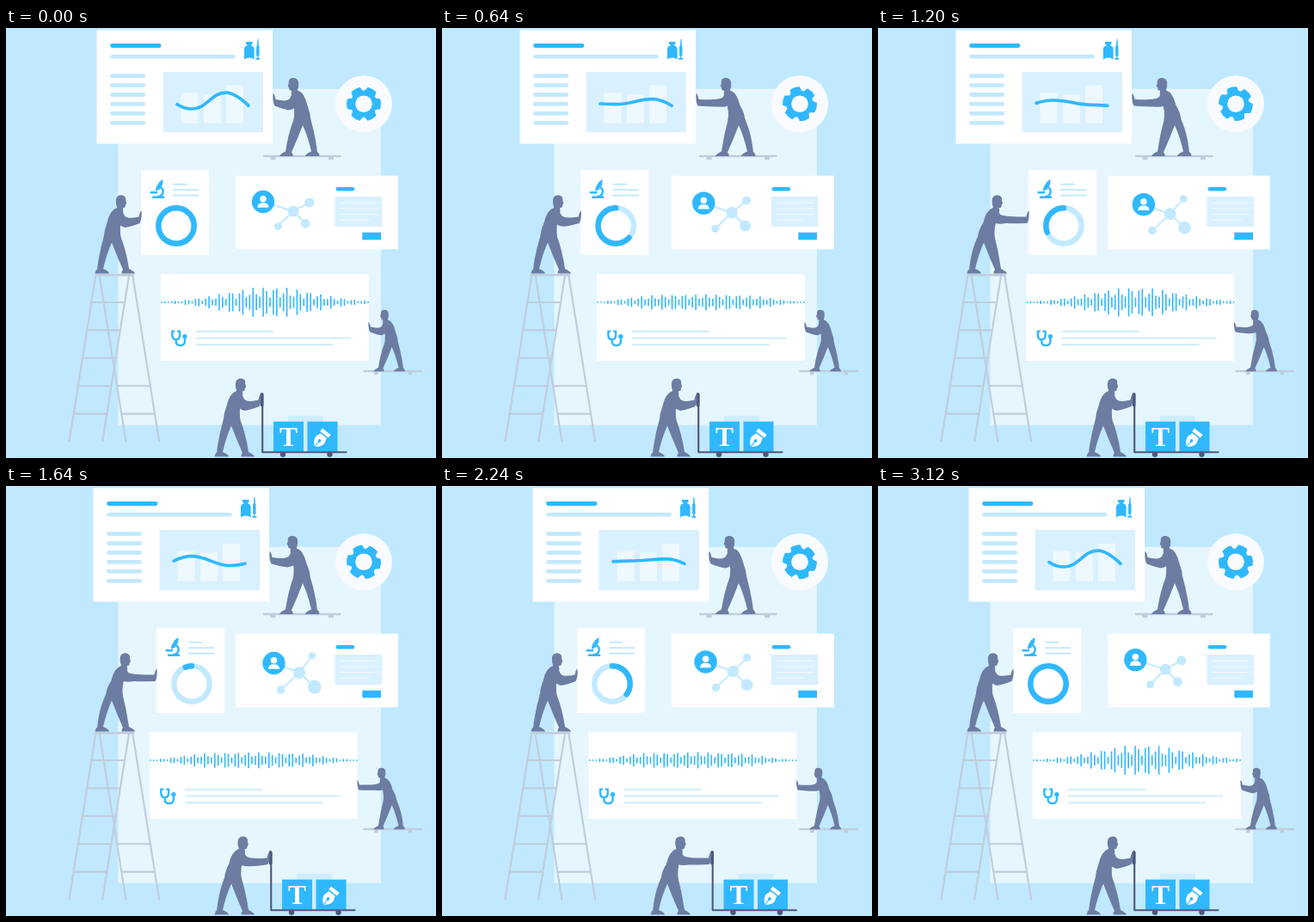
Animation of 500 by 500 pixels, one loop 3160 ms. Source, as an HTML page with a canvas:

```html
<!DOCTYPE html>
<html lang="en">
<head>
<meta charset="utf-8">
<title>Building a health dashboard</title>
<style>
html, body { margin: 0; width: 100%; height: 100%; overflow: hidden; background: #c0e9ff; }
canvas { display: block; width: 500px; height: 500px; }
</style>
</head>
<body>
<canvas id="stage" width="500" height="500"></canvas>
<script>
const ctx = document.getElementById('stage').getContext('2d');
const LOOP = 3160, STEP = 40, TAU = Math.PI * 2;
const SKY = '#c0e9ff', PANEL = '#e6f6ff', BLUE = '#30b8ff', PALE = '#c2e9ff',
  SOFT = '#d9f0ff', MIST = '#eef8ff', MAN = '#6c7ca2', STEEL = '#bfcddb',
  CART = '#4a587f', WHITE = '#fff';

const mix = (a, b, k) => a + (b - a) * k;
const ramp = (t, start, end) => Math.min(1, Math.max(0, (t - start) / (end - start)));
// rises during the first span, falls during the second
const trip = (t, a, b, c, d) => ramp(t, a, b) - ramp(t, c, d);

function rect(x1, y1, x2, y2, color) {
  ctx.fillStyle = color;
  ctx.fillRect(x1, y1, x2 - x1, y2 - y1);
}

function dot(x, y, r, color) {
  ctx.beginPath();
  ctx.arc(x, y, r, 0, TAU);
  ctx.fillStyle = color;
  ctx.fill();
}

function shape(path, color) {
  ctx.fillStyle = color;
  ctx.fill(new Path2D(path));
}

function wire(path, width, color, cap = 'round') {
  ctx.lineWidth = width;
  ctx.strokeStyle = color;
  ctx.lineCap = cap;
  ctx.lineJoin = 'round';
  ctx.stroke(path instanceof Path2D ? path : new Path2D(path));
}

function line(x1, y1, x2, y2, width, color, cap) {
  wire(`M${x1} ${y1}L${x2} ${y2}`, width, color, cap);
}

function arc(x, y, r, from, to, ccw, width, color) {
  const path = new Path2D();
  path.arc(x, y, r, from, to, ccw);
  wire(path, width, color);
}

function at(x, y, draw) {
  ctx.save();
  ctx.translate(x, y);
  draw();
  ctx.restore();
}

// x, y: ground point; reach: how far the hand is pushed out, in pixels
function man(x, y, size, flip, reach) {
  const q = reach / size / 15, lean = -4 * q, hip = lean / 2, hand = -15 * q;
  at(x, y, () => {
    ctx.scale(size * flip, size);
    // legs
    shape(`M${20 + hip}-44Q24-30 26-18Q27.5-10 27.8-5.2Q30.5-3.5 30.5 0H14Q14-2.5 21-5.5
      Q17-23 11-36Q5-20-2-4.5Q0-2.5-.5 0H-16Q-15.5-2.5-9-5.5Q-6-26 ${1 + hip}-44z`, MAN);
    // torso
    shape(`M${5 + lean}-76.5Q${13 + lean}-74 ${16.5 + lean}-59Q${20 + hip}-50 ${20.3 + hip}-42
      H${.6 + hip}Q${2 + hip}-54 ${lean}-64Q${-3 + lean}-71 ${-2 + lean}-75z`, MAN);
    // arm
    shape(`M${5 + lean}-75Q${-1 + lean}-75 ${-3 + lean}-69Q${-5 - 5 * q} ${-62 - 3 * q} ${-20.5 + hand}-66
      Q${-21.5 + hand}-72 ${-23.5 + hand}-73Q${-24.3 + hand}-64 ${-21.5 + hand}-58.5
      Q${-10 - 12 * q} ${-54 - 3.5 * q} ${-4 - 9 * q} ${-53.5 - 4 * q}Q${4 + lean}-56 ${8 + lean}-63z`, MAN);
    // head
    at(lean, 0, () => shape(`M-5.2-85Q-6-90-1-91Q6-91.5 6.2-84.5Q6.3-80 5-77.5V-73H-2V-76.3
      Q-4.8-76-4.9-79.5L-6.2-81.5z`, MAN));
  });
}

function shelf(x1, x2, y, inset, w) {
  line(x1, y, x2, y, 2.4, STEEL);
  rect(x1 + inset, y + 1, x1 + inset + w, y + 4.2, STEEL);
  rect(x2 - inset - w, y + 1, x2 - inset, y + 4.2, STEEL);
}

function gear(turn) {
  dot(416, 88.3, 33, '#f9fbff');
  at(416, 88.3, () => {
    const path = new Path2D();
    for (let i = 0; i < 6; i++) {
      const a = turn + i * TAU / 6;
      path.arc(0, 0, 19.3, a - .27, a + .27);
      path.arc(0, 0, 14.8, a + .43, a + TAU / 6 - .43);
    }
    path.closePath();
    ctx.fillStyle = BLUE;
    ctx.fill(path);
    wire(path, 1.4, BLUE);
  });
  dot(416, 88.3, 9.8, '#f9fbff');
}

function chartCard(s) {
  rect(105.5, 2.5, 310, 134.5, WHITE);
  line(123.5, 20.5, 178, 20.5, 4.8, BLUE);
  line(123.5, 33.2, 264.5, 33.2, 4.6, PALE);
  for (let y = 55.6; y < 111; y += 10.95) line(123.5, y, 159.7, y, 4.8, PALE);
  rect(182.5, 51, 299, 121.3, SOFT);
  rect(203.5, 75.3, 223.5, 110.7, MIST);
  rect(230, 77.3, 250, 110.7, MIST);
  rect(256, 66.7, 276, 110.7, MIST);
  // two turning points slide and swap between valley and hill
  const x1 = mix(216, 220, s), y1 = mix(94, 81, s);
  const x2 = mix(256, 265, s), y2 = mix(75.2, 93.5, s);
  wire(`M199 ${mix(88.7, 87, s)}Q${x1 - 9} ${y1} ${x1} ${y1}
    C${x1 + 18} ${y1} ${x2 - 18} ${y2} ${x2} ${y2}Q${x2 + 10} ${y2} 282 90.3`, 3.7, BLUE);
  shape('M279 16h7.5v3h-1.3v1.4q3.4 1 3.4 3.6v12.6q-2.8-2-5.8-2t-5.8 2V24q0-2.6 3.4-3.6V19H279z', BLUE);
  shape('M292.5 13h1l.4 8h.6v11.5h-1v2.5h1.8v1.8h-5V35h1.8v-2.5h-1V21h.8z', BLUE);
}

function ringCard(part, ccw) {
  rect(157, 165.3, 236, 264, WHITE);
  line(195, 181.7, 209.5, 181.7, 1.9, PALE);
  line(195, 188.2, 223.5, 188.2, 1.9, PALE);
  line(195, 194.7, 223.5, 194.7, 1.9, PALE);
  // microscope
  wire('M168.6 191.2h6.5M171 196.8h12.2M180.3 185.5q3.4 2.5 2 6.5t-5.3 4', 2.4, BLUE);
  line(180, 180.7, 176.8, 186, 4.8, BLUE);
  line(181.6, 177.7, 175, 188.3, 2.3, BLUE);
  const top = -TAU / 4, turn = part * TAU;
  arc(198, 230, 20.7, 0, TAU, false, 6.4, PALE);
  if (part > 0) arc(198, 230, 20.7, top, ccw ? top - turn : top + turn, ccw, 6.4, BLUE);
}

function networkCard(s) {
  rect(267, 171.8, 456, 257.3, WHITE);
  const node = (x, y, r, dx, dy, dr) => [x + dx * s, y + dy * s, r + dr * s];
  const user = node(299, 202, 13.2, 13, 4.2, 0);
  const hub = node(334, 213, 6.4, 7.5, 4.2, .7);
  const leaves = [
    node(352.7, 203, 5.6, 3.3, -5.8, -1.5),
    node(348.2, 227.3, 5.4, 11, 6.7, 2.6),
    node(316.4, 230.6, 4.4, 3.4, 6.6, .5)
  ];
  [user, ...leaves].forEach(([x, y]) => line(hub[0], hub[1], x, y, 2, PALE));
  [hub, ...leaves].forEach(n => dot(...n, PALE));
  dot(...user, BLUE);
  at(user[0], user[1], () => {
    dot(0, -3.3, 3.7, WHITE);
    shape('M-6.6 6.8q0-5.6 6.6-5.6t6.6 5.6z', WHITE);
  });
  line(385.8, 187.2, 403, 187.2, 4.4, BLUE);
  rect(382.5, 196, 437.3, 231, SOFT);
  for (let i = 0; i < 4; i++) line(389.5, 203.5 + i * 6.6, i < 3 ? 432 : 422, 203.5 + i * 6.6, 1.5, MIST);
  rect(414.3, 237.7, 436, 246.3, BLUE);
}

// half height of signal bar i: a beat inside a bell
function bar(i, calm) {
  const beat = (crest, gap) => .3 + .7 * Math.cos(Math.PI * (i - crest) / gap) ** 2;
  const loud = 18 * Math.exp(-(((i - 32) / 19) ** 2)) * beat(27, 3.3);
  const soft = 9.5 * Math.exp(-(((i - 30) / 24) ** 4)) * beat(16, 3.2);
  return Math.max(.8, mix(loud, soft, calm));
}

function signalCard(calm) {
  rect(180, 286.3, 421.7, 387, WHITE);
  for (let i = 0; i < 62; i++) {
    const x = 181 + i * 3.935, r = bar(i, calm) - .6;
    line(x, 319 - r, x, 319 + r, 1.6, BLUE);
  }
  line(222, 353, 310, 353, 2.4, '#d4efff');
  line(222, 360.6, 400, 360.6, 2.4, '#d4efff');
  line(222, 368.2, 380, 368.2, 2.4, '#d4efff');
  wire('M195.3 352.6h-2v4.2q0 5.4 4.4 5.4t4.4-5.4v-4.2h-2M197.7 362.5v2q0 4.6 5 4.6t5.2-4.6v-5', 2.4, BLUE);
  dot(207.9, 358.6, 2.7, BLUE);
}

function ladder() {
  const left = 104.3, right = 143, gap = 4.3, slope = .16;
  line(104, 287.3, 148, 287.3, 2.6, STEEL);
  [left, right].forEach(x => {
    line(x, 288, x - 30.8, 480.5, 2.1, STEEL);
    line(x + gap, 288, x + gap + 30.8, 480.5, 2.1, STEEL);
  });
  for (let i = 0; i < 5; i++) {
    const y = 319 + i * 32.4, d = (y - 288) * slope;
    line(left - d, y, right - d, y, 2.1, STEEL);
    if (i > 2) line(left + gap + d, y, right + gap + d, y, 2.1, STEEL);
  }
}

function cart() {
  rect(328, 450.7, 369, 492, '#cfedff');
  rect(311, 457.6, 346, 492.6, BLUE);
  rect(350.5, 457.6, 385.5, 492.6, BLUE);
  ctx.fillStyle = WHITE;
  ctx.font = 'bold 31.5px "Liberation Serif", serif';
  ctx.textAlign = 'center';
  ctx.fillText('T', 328.5, 486.2);
  at(359, 487, () => {
    ctx.rotate(.66);
    shape('M0 0Q-6.5-5-6.5-10.5L-4.5-16.5H4.5L6.5-10.5Q6.5-5 0 0zM-6-18H6V-22.5H-6z', WHITE);
    line(0, 0, 0, -8, 1.1, BLUE, 'butt');
    dot(0, -9, 1.9, BLUE);
  });
  wire('M298.2 426v67.3H395.5', 2.1, CART);
  line(297.6, 426, 297.6, 438.5, 3.8, CART);
  dot(322, 495.8, 3.2, CART);
  dot(376.5, 495.8, 3.2, CART);
}

function draw(t) {
  const top = 15 * trip(t, 0, 600, 1200, 1800);
  const left = 18 * trip(t, 500, 1100, 1680, 2240);
  const right = 13 * trip(t, 900, 1420, 2100, 2600);
  const push = 16.5 * trip(t, 1300, 1860, 2540, 3100);
  const wave = trip(t, 0, 1560, 1560, 3000);
  const drift = trip(t, 0, LOOP / 2, LOOP / 2, LOOP);
  const ring = 1 - trip(t, 0, 1740, 1740, LOOP);
  const calm = trip(t, 0, 620, 620, 1180) + trip(t, 1180, 1660, 2200, 3000);

  rect(0, 0, 500, 500, SKY);
  rect(130.5, 70.8, 436, 461.7, PANEL);
  line(236, 202, 267, 202, 1, '#e0f3ff');
  line(236, 230, 267, 230, 1, '#e0f3ff');

  gear(t / LOOP * TAU);
  at(-top, 0, () => chartCard(wave));
  at(left, 0, () => ringCard(ring, t < 1740));
  networkCard(drift);
  at(-right, 0, () => signalCard(calm));

  shelf(300, 388.5, 149, 7.5, 6);
  man(334, 149, 1, 1, top);
  ladder();
  man(134, 285.4, 1, -1, left);
  shelf(416.5, 483.5, 399, 11.5, 4.5);
  man(440, 399.3, .785, 1, right);
  at(push, 0, cart);
  man(273, 498.5, 1, -1, push);
}

function frame(now) {
  draw(Math.floor(now % LOOP / STEP) * STEP);
  requestAnimationFrame(frame);
}
draw(0);
requestAnimationFrame(frame);
</script>
</body>
</html>
```
